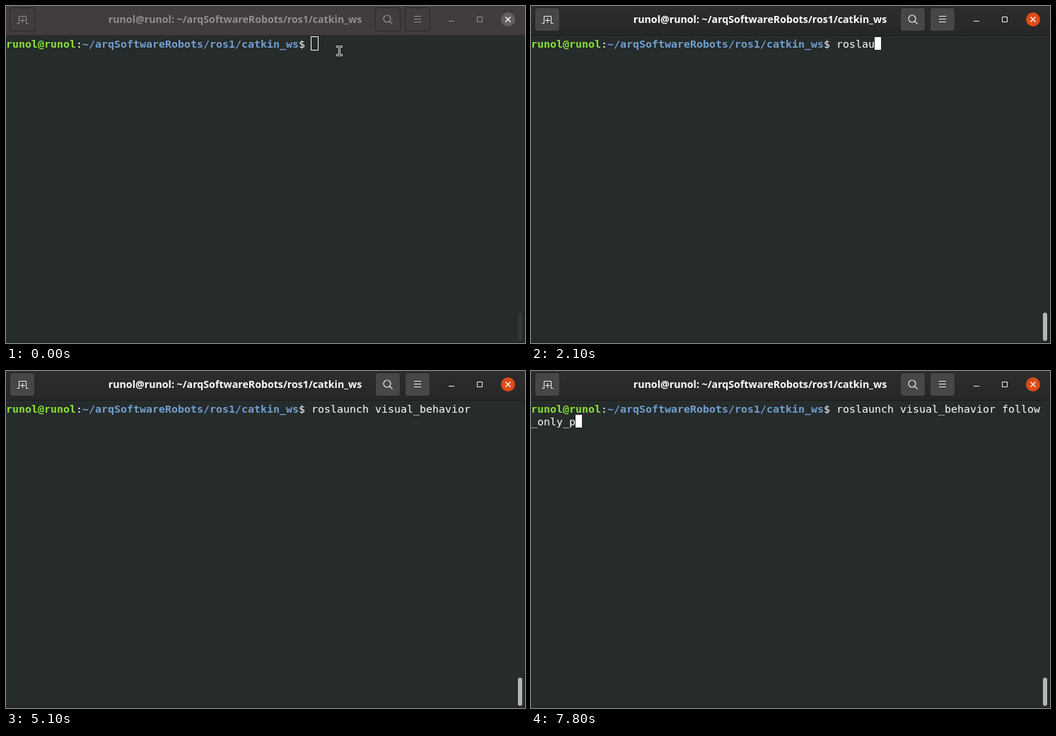
Write an HTML page with a canvas that moves like this. It is 734x477 px and loops after 8000 ms.

```html
<!DOCTYPE html>
<html lang="en">
<head>
<meta charset="utf-8">
<title>Terminal</title>
<style>
  html, body { margin: 0; width: 100%; height: 100%; overflow: hidden; background: #262b2b; }
  canvas { display: block; }
</style>
</head>
<body>
<canvas id="stage" width="734" height="477"></canvas>
<script>
const ctx = document.getElementById('stage').getContext('2d');
const LOOP = 8000;
const W = 734, H = 477;
const CELL_W = 9, CELL_H = 18, TOP = 44, COLS = 80;
const USER = 'runol@runol', PATH = '~/arqSoftwareRobots/ros1/catkin_ws';
const PROMPT = [[USER, '#8ae234', true], [':', '#fff'], [PATH, '#729fcf', true], ['$ ', '#fff']];

// [time in ms, text added to the command line]
const KEYS = [
  [1000, 'r'], [1100, 'o'], [1300, 's'], [1400, 'l'], [1500, 'a'], [2100, 'u'], [2200, 'n'],
  [2400, 'c'], [2500, 'h'], [2700, ' '], [3100, 'v'], [3200, 'i'], [3300, 's'], [3400, 'u'],
  [3500, 'a'], [3600, 'l'], [3900, '_'], [4100, 'b'], [4200, 'e'], [4400, 'h'], [4500, 'avior '],
  [5600, 'fo'], [5700, 'l'], [5900, 'l'], [6100, 'o'], [6200, 'w'], [6500, '_'], [6800, 'o'],
  [6900, 'n'], [7100, 'l'], [7200, 'y'], [7500, '_'], [7800, 'p']
];
const FOCUS_AT = 300, POINTER_HIDES = 1000;
const BLINK_OFF = [[900, 1000], [5100, 5600]];

const mix = (a, b, k) =>
  `rgb(${a.map((v, i) => Math.round(v + (b[i] - v) * k)).join()})`;
const grey = v => [v, v, v];

function focusAmount(t) {
  if (t < FOCUS_AT) return 0;
  const p = Math.min(1, (t - FOCUS_AT + 100) / 400);
  return 1 - (1 - p) ** 3;
}

function rect(color, x, y, w, h) {
  ctx.fillStyle = color;
  ctx.fillRect(x, y, w, h);
}

function rounded(color, x, y, w, h, r) {
  ctx.fillStyle = color;
  ctx.beginPath();
  ctx.roundRect(x, y, w, h, r);
  ctx.fill();
}

function line(d, color, width = 1) {
  ctx.strokeStyle = color;
  ctx.lineWidth = width;
  ctx.stroke(new Path2D(d));
}

function headerButton(x, k) {
  rounded(mix([44, 42, 44], [37, 37, 37], k), x, 2, 36, 34, 4);
  rounded(mix([64, 60, 63], [72, 71, 72], k), x + 1, 3, 34, 32, 3.5);
}

function drawHeader(k) {
  const bar = ctx.createLinearGradient(0, 0, 0, 41);
  bar.addColorStop(0, mix([64, 60, 63], grey(45), k));
  bar.addColorStop(1, mix([63, 59, 62], grey(39), k));
  rect(bar, 0, 0, W, 41);
  rect(mix([48, 46, 48], [29, 30, 30], k), 0, 41, W, 1);

  [5, 522, 564].forEach(x => headerButton(x, k));
  const icon = mix([150, 147, 145], grey(240), k);
  line('M15.5 24.5H18.5V14.5H28.5V24.5H31.5M23.5 17V24M20 20.5H27', icon);
  line('M544 18a5 5 0 1 1-10 0a5 5 0 1 1 10 0M542.7 21.7L546.5 25.5', icon, 1.2);
  line('M577 14.5H587M577 18.5H587M577 22.5H587', icon);
  line('M626 21.5H634M666.5 15.5H673.5V22.5H666.5Z', icon);

  ctx.fillStyle = mix([98, 95, 94], [221, 75, 24], k);
  ctx.beginPath();
  ctx.arc(710, 19, 10, 0, Math.PI * 2);
  ctx.fill();
  line('M706.5 15.5L713.5 22.5M713.5 15.5L706.5 22.5', '#fff', 1.4);

  ctx.font = 'bold 14.2px "Noto Sans", sans-serif';
  ctx.textAlign = 'center';
  ctx.fillStyle = mix([147, 143, 140], grey(255), k);
  ctx.fillText(`${USER}: ${PATH}`, 324, 24);
}

// Writes text on the terminal grid and returns the next cell index.
function write(text, cell, color, bold) {
  ctx.font = `${bold ? 'bold ' : ''}14.95px "DejaVu Sans Mono", monospace`;
  ctx.textAlign = 'left';
  ctx.fillStyle = color;
  for (const ch of text) {
    const [x, y] = cellPos(cell++);
    ctx.fillText(ch, x, y + 15);
  }
  return cell;
}

function cellPos(cell) {
  return [cell % COLS * CELL_W, TOP + Math.floor(cell / COLS) * CELL_H];
}

function drawCursor(t, cell) {
  const [x, y] = cellPos(cell);
  if (t < FOCUS_AT) {
    ctx.strokeStyle = '#fff';
    ctx.lineWidth = 1;
    ctx.strokeRect(x - 0.5, y - 0.5, CELL_W + 1, CELL_H + 1);
  } else if (!BLINK_OFF.some(([from, to]) => t >= from && t < to)) {
    rect('#fff', x, y, CELL_W, CELL_H);
  }
}

function drawPointer() {
  const beam = 'M468.5 57.5H474.5M471.5 57.5V69.5M468.5 69.5H474.5';
  ctx.lineCap = 'square';
  line(beam, '#fff', 2.6);
  line(beam, '#111', 0.9);
  ctx.lineCap = 'butt';
}

function draw(t) {
  const k = focusAmount(t);
  rect('#262b2b', 0, 0, W, H);
  drawHeader(k);

  let cell = 0;
  for (const [text, color, bold] of PROMPT) cell = write(text, cell, color, bold);
  const typed = KEYS.filter(([at]) => t >= at).map(([, text]) => text).join('');
  cell = write(typed, cell, '#fff');
  drawCursor(t, cell);

  rounded(mix([52, 55, 55], [180, 182, 181], k), 724, 434, 6, 40, 3);
  rect('#1b1f1f', 733, 42, 1, H - 42);
  rect('#1b1f1f', 0, 476, W, 1);
  if (t < POINTER_HIDES) drawPointer();
}

const start = performance.now();
function tick() {
  const t = (performance.now() - start) % LOOP;
  draw(Math.floor(t / 100) * 100);
  requestAnimationFrame(tick);
}
tick();
</script>
</body>
</html>
```
